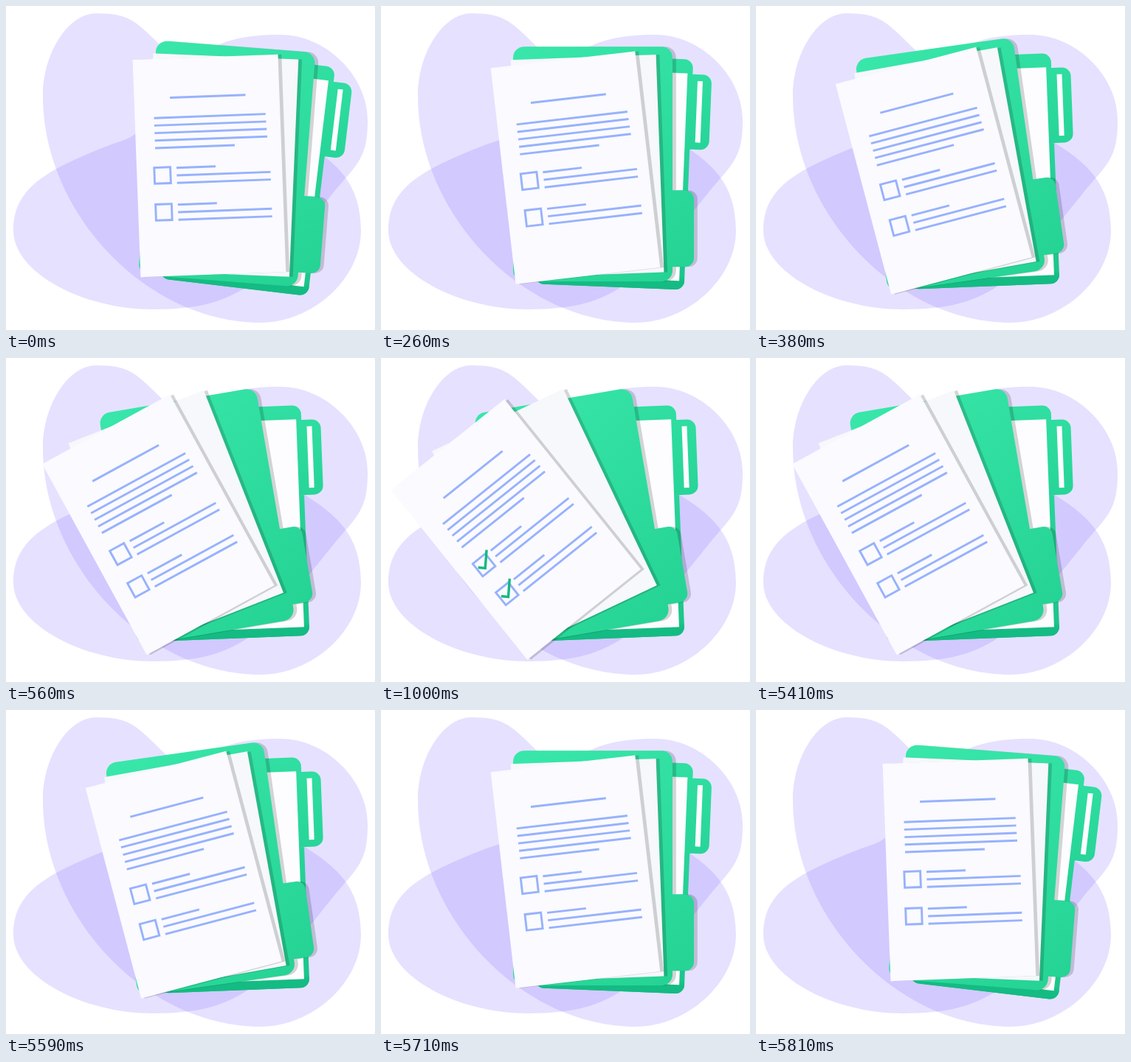
Write an HTML page with a canvas that moves like this. It is 500 px wide and 440 px high and loops after 7.08 s.

```html
<!DOCTYPE html>
<html lang="en">
<head>
<meta charset="utf-8">
<title>Checklist folder</title>
<style>
  html, body { margin: 0; width: 100%; height: 100%; overflow: hidden; background: #fff; }
  canvas { display: block; }
</style>
</head>
<body>
<canvas id="stage" width="500" height="440"></canvas>
<script>
const ctx = document.getElementById('stage').getContext('2d');
const LOOP = 7080, START = 160, END = 1000, MIRROR = 5970, STEP = 20;
const INK = '#97b2fc', TICK = '#14b981', SHADOW = 'rgba(0,0,0,.165)';
const PAGE_W = 197, PAGE_H = 295.5, SHADOW_SHIFT = 4.8;
const rad = deg => deg * Math.PI / 180;

// Sine ease in and out between two times
function ease(t, from, to) {
  const x = Math.min(1, Math.max(0, (t - from) / (to - from)));
  return (1 - Math.cos(Math.PI * x)) / 2;
}

// The stack opens, rests, then plays the same motion backwards
function openingTime(t) {
  const v = t < LOOP / 2
    ? Math.floor(t / STEP) * STEP
    : Math.ceil((MIRROR - t) / STEP) * STEP;
  return Math.min(END, Math.max(START, v));
}

// Closed smooth outline through a few points, each with the heading of the pen.
// A handle is as long as half the chord seen along its own heading.
function blob(...points) {
  const path = new Path2D();
  path.moveTo(points[0].x, points[0].y);
  points.forEach((p, i) => {
    const q = points[(i + 1) % points.length];
    const handle = (at, sign) => {
      const c = Math.cos(rad(at.heading)), s = Math.sin(rad(at.heading));
      const length = sign * .52 * ((q.x - p.x) * c + (q.y - p.y) * s);
      return [at.x + c * length, at.y + s * length];
    };
    path.bezierCurveTo(...handle(p, 1), ...handle(q, -1), q.x, q.y);
  });
  return path;
}
const pen = (x, y, heading) => ({ x, y, heading });

const blobs = [
  blob(pen(122, 10, 180), pen(50, 122, 90), pen(345, 430, 0),
       pen(481, 305, -90), pen(213, 57, -136)),
  blob(pen(10, 305, -90), pen(130, 193, -22), pen(190, 155, -58), pen(372, 39, 0),
       pen(490, 155, 90), pen(440, 258, 129), pen(200, 412, 180))
];

// A folder leaf hangs left and down from its top right corner, with a tab on that side
function leaf(width, height, radius, tabTop, tabHeight, tabWidth) {
  const path = new Path2D();
  path.roundRect(-width, 0, width, height, radius);
  path.roundRect(-2 * radius, tabTop, tabWidth + 2 * radius, tabHeight, 12);
  return path;
}

function page(left) {
  const path = new Path2D();
  path.rect(left, 0, PAGE_W, PAGE_H);
  return path;
}

function shade(x, y, from, to) {
  const g = ctx.createLinearGradient(x, 0, 0, y);
  g.addColorStop(0, from);
  g.addColorStop(1, to);
  return g;
}

const back = { x: 446.2, y: 83.1, angle: 6.8,
  path: leaf(202, 313, 12, 20, 102, 26), fill: shade(0, 313, '#30dfa1', '#1bc489') };
const cover = { x: 419.5, y: 63.5, angle: 4.5,
  path: leaf(216, 319, 15, 195, 104, 29), fill: shade(-216, 319, '#39e7aa', '#25d395') };
const rearPage = { x: 396.3, y: 72.6, angle: 2.4, path: page(-PAGE_W), fill: '#f6f8fb' };
const frontPage = { x: 171.6, y: 73, angle: -2.1, path: page(0), fill: '#fafaff' };

// Turns run from the outermost to the innermost
const turn = (deg, x, y) => ({ deg, x, y });

function place(layer, turns, shift = 0) {
  ctx.setTransform(1, 0, 0, 1, shift, 0);
  for (const { deg, x, y } of turns) {
    ctx.translate(x, y);
    ctx.rotate(rad(-deg));
    ctx.translate(-x, -y);
  }
  ctx.translate(layer.x, layer.y);
  ctx.rotate(rad(layer.angle));
}

function drawLayer(layer, turns, hasShadow = true) {
  if (hasShadow) {
    place(layer, turns, SHADOW_SHIFT);
    ctx.fillStyle = SHADOW;
    ctx.fill(layer.path);
  }
  place(layer, turns);
  ctx.fillStyle = layer.fill;
  ctx.fill(layer.path);
}

function rule(x0, x1, y) {
  ctx.beginPath();
  ctx.moveTo(x0, y);
  ctx.lineTo(x1, y);
  ctx.stroke();
}

function drawTick(y, amount) {
  if (amount <= 0) return;
  const length = 34.6;
  ctx.strokeStyle = TICK;
  ctx.lineWidth = 3.4;
  ctx.setLineDash([length * amount, length * 2]);
  ctx.beginPath();
  ctx.moveTo(26.4, y + 8.5);
  ctx.lineTo(33.3, y + 15.2);
  ctx.lineTo(50.4, y - 3.1);
  ctx.stroke();
  ctx.setLineDash([]);
}

function drawItem(y, amount) {
  ctx.strokeRect(23.8, y, 21.8, 21.8);
  for (let i = 0; i < 3; i++) rule(54, i ? 181.2 : 107, y + 1.3 + i * 10.3);
  ctx.save();
  drawTick(y, amount);
  ctx.restore();
}

function drawText(amount) {
  ctx.strokeStyle = INK;
  ctx.lineWidth = 2.9;
  rule(48.6, 151, 53.3);
  for (let i = 0; i < 5; i++) rule(26, i < 4 ? 177.3 + i * .4 : 134, 80.2 + i * 10.2);
  for (let i = 0; i < 2; i++) drawItem(147.5 + i * 50, amount);
}

// The back folder's sheet, its dark lower rim and the slot in its tab
function drawBackDetails() {
  const rim = ctx.createLinearGradient(0, 295, 0, 313);
  rim.addColorStop(0, 'rgba(19,186,129,0)');
  rim.addColorStop(.5, '#14bb82');
  ctx.fillStyle = rim;
  ctx.fill(back.path);
  ctx.fillStyle = '#fdfdff';
  ctx.fillRect(-190, 19, 183, 282);
  ctx.fillRect(7, 29, 7, 83.5);
}

function draw(time) {
  const t = openingTime(time);
  const whole = [turn(9 * ease(t, 160, 360), 302, 371)];
  const lid = [...whole, turn(5.2 * ease(t, 260, 450), 252, 387)];
  const fan = 13.6 * ease(t, 370, 668);
  const extra = 8.8 * ease(t, 370, 880);

  ctx.setTransform(1, 0, 0, 1, 0, 0);
  ctx.fillStyle = '#fff';
  ctx.fillRect(0, 0, 500, 440);
  ctx.fillStyle = 'rgba(130,105,255,.2)';
  for (const b of blobs) ctx.fill(b);

  drawLayer(back, whole, false);
  drawBackDetails();
  drawLayer(cover, lid);
  drawLayer(rearPage, [...lid, turn(fan, 239.6, 333)]);
  drawLayer(frontPage, [...lid, turn(fan + extra, 237, 351)]);
  drawText(ease(t, 830, 1010));
}

let origin;
function frame(now) {
  origin ??= now;
  draw((now - origin) % LOOP);
  requestAnimationFrame(frame);
}
draw(0);
requestAnimationFrame(frame);
</script>
</body>
</html>
```
